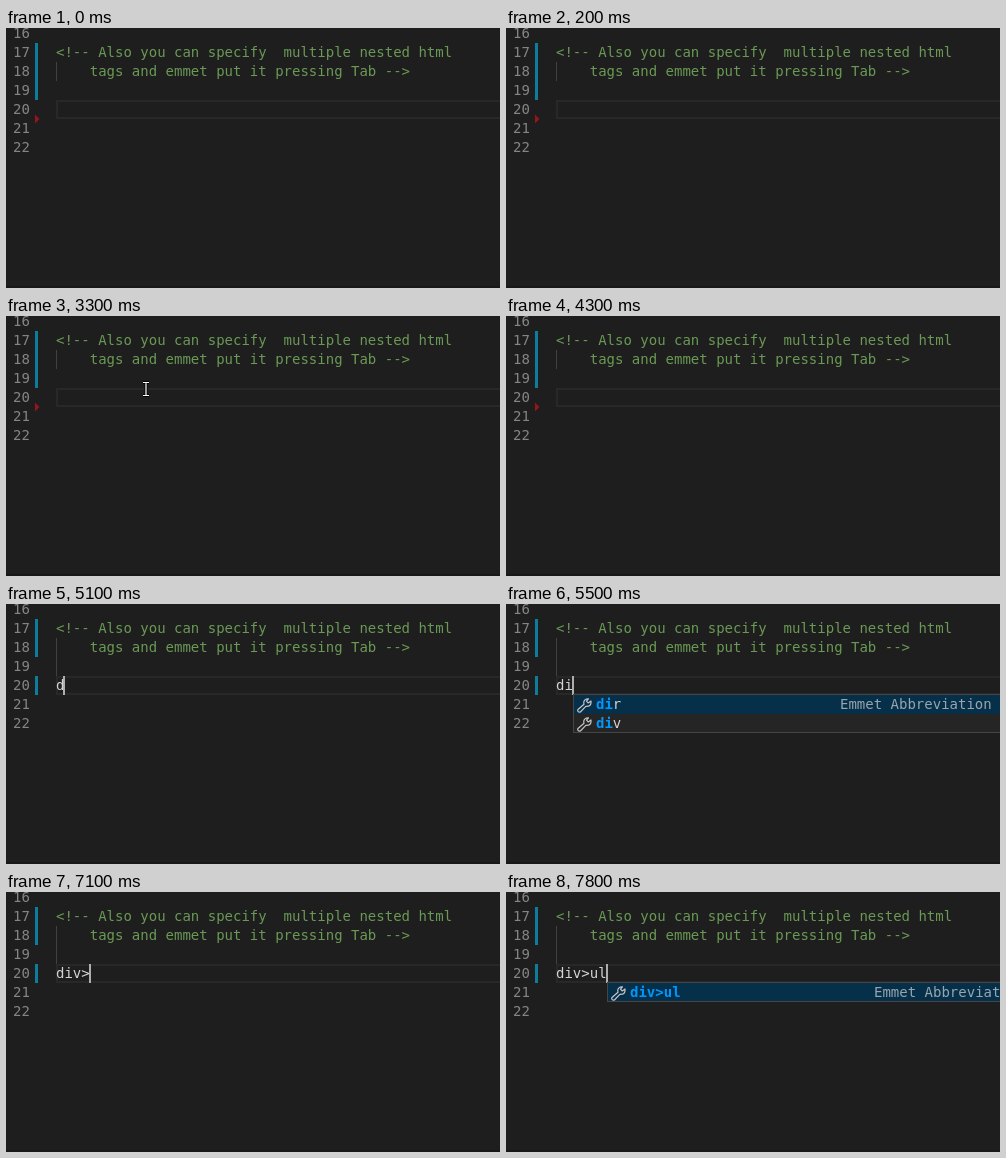
These frames come from a looping animation (494 by 260 pixels, 8 s). An HTML page with a canvas:

```html
<!DOCTYPE html>
<html lang="en">
<head>
<meta charset="utf-8">
<title>Editor: nested tag abbreviations</title>
<style>
  html, body { margin: 0; width: 100%; height: 100%; overflow: hidden; background: #1e1e1e; }
  canvas { display: block; }
</style>
</head>
<body>
<canvas id="stage" width="494" height="260"></canvas>
<script>
const ctx = document.getElementById('stage').getContext('2d');
const LOOP = 8000, ROW = 19, LEFT = 50, CHAR = 8.428;
const FONT = '14px "DejaVu Sans Mono", monospace';

// Typed text and suggestions from each moment on.
const typing = [
  { at: 0, text: '', items: [] },
  { at: 5000, text: 'd', items: [] },
  { at: 5200, text: 'd', items: ['datag', 'datal', 'dd', 'del', 'det', 'dfn', 'dir', 'div', 'dl'] },
  { at: 5500, text: 'di', items: ['dir', 'div'] },
  { at: 5900, text: 'div', items: ['div'] },
  { at: 7100, text: 'div>', items: [] },
  { at: 7500, text: 'div>u', items: [] },
  { at: 7600, text: 'div>u', items: ['div>u'] },
  { at: 7800, text: 'div>ul', items: ['div>ul'] }
];

const within = (t, from, to) => t >= from && t < to;
const lineTop = n => 15 + (n - 17) * ROW;

function rect(x, y, w, h, color) {
  ctx.fillStyle = color;
  ctx.fillRect(x, y, w, h);
}

function frame(x, y, w, h, color, width = 1) {
  ctx.strokeStyle = color;
  ctx.lineWidth = width;
  ctx.strokeRect(x, y, w, h);
}

function write(text, x, top, color, bold = false) {
  ctx.font = (bold ? 'bold ' : '') + FONT;
  ctx.fillStyle = color;
  ctx.fillText(text, x, top + 14);
}

function caretVisible(t) {
  if (t < 5000) return within(t, 2800, 3300) || within(t, 3800, 4300) || t >= 4800;
  return !within(t, 6400, 6900);
}

function drawEditor(t, text) {
  const typed = text !== '';
  rect(0, 0, 494, 260, '#1e1e1e');
  rect(0, 258, 494, 2, '#1a1719');
  frame(LEFT + 1, lineTop(20) + 1, 460, ROW - 2, '#282828', 2);

  for (let n = 16; n <= 22; n++) write(n, 7, lineTop(n), '#858585');
  write('<!-- Also you can specify  multiple nested html', LEFT, lineTop(17), '#6a9955');
  write('    tags and emmet put it pressing Tab -->', LEFT, lineTop(18), '#6a9955');
  rect(LEFT, lineTop(18), 1, ROW * (typed ? 2 : 1), '#404040');

  rect(29, lineTop(17), 3, ROW * (typed ? 2 : 3), '#0c7d9d');
  if (typed) {
    rect(29, lineTop(20), 3, ROW, '#0c7d9d');
  } else {
    ctx.fillStyle = '#94151b';
    ctx.fill(new Path2D('M29 86.5l4.5 4.5-4.5 4.5z'));
  }

  write(text, LEFT, lineTop(20), '#d4d4d4');
  if (caretVisible(t)) rect(Math.round(LEFT + text.length * CHAR) - 1, lineTop(20), 2, ROW, '#aeafad');
}

function drawWrench(x, y) {
  ctx.save();
  ctx.translate(x, y);
  ctx.strokeStyle = '#c5c5c5';
  ctx.lineWidth = 1.2;
  ctx.lineJoin = 'round';
  ctx.stroke(new Path2D('M1 11.5L7 6.3Q6 2.5 9 1.2L11.5 .8 9.5 3.2 11.3 5 14 3Q14.5 7 11.5 8.2L8.8 8.4 3.4 14Q2 14.6 1 13.4 .2 12.4 1 11.5z'));
  ctx.restore();
}

function drawSuggestions(text, items) {
  if (!items.length) return;
  const x = Math.round(LEFT + text.length * CHAR), top = lineTop(21);
  rect(x, top, 429, ROW * items.length, '#252526');
  rect(x, top, 429, ROW, '#062f4a');
  frame(x + .5, top - .5, 429, ROW * items.length, '#454545');
  items.forEach((item, i) => {
    const y = top + i * ROW;
    drawWrench(x + 4, y + 3);
    write(text, x + 23, y, '#0097fb', true);
    write(item.slice(text.length), x + 23 + text.length * CHAR, y, '#d4d4d4');
  });
  write('Emmet Abbreviation', x + 267, top, '#97a5ae');
}

function pointerAt(t) {
  const move = (x0, y0, x1, y1, p) => [x0 + (x1 - x0) * p, y0 + (y1 - y0) * p];
  if (within(t, 1800, 3400)) {
    const p = Math.min(1, (t - 1800) / 600);
    return move(330, 108, 140, 73, p * p * (3 - 2 * p));
  }
  if (within(t, 3400, 3600)) return move(140, 73, 258, 28, (t - 3300) / 200);
  return null;
}

function drawPointer(t) {
  const spot = pointerAt(t);
  if (!spot) return;
  const [x, y] = spot.map(Math.round);
  const beam = new Path2D(`M${x - 3} ${y - 6.5}h2.5l.5 .5 .5-.5h2.5M${x} ${y - 6}v12M${x - 3} ${y + 6.5}h2.5l.5-.5 .5 .5h2.5`);
  for (const [color, width] of [['#000', 3], ['#fff', 1.2]]) {
    ctx.strokeStyle = color;
    ctx.lineWidth = width;
    ctx.stroke(beam);
  }
}

function draw(now) {
  const t = Math.floor(now % LOOP / 100) * 100;
  const { text, items } = typing.findLast(step => step.at <= t);
  drawEditor(t, text);
  drawSuggestions(text, items);
  drawPointer(t);
  requestAnimationFrame(draw);
}
requestAnimationFrame(draw);
</script>
</body>
</html>
```
